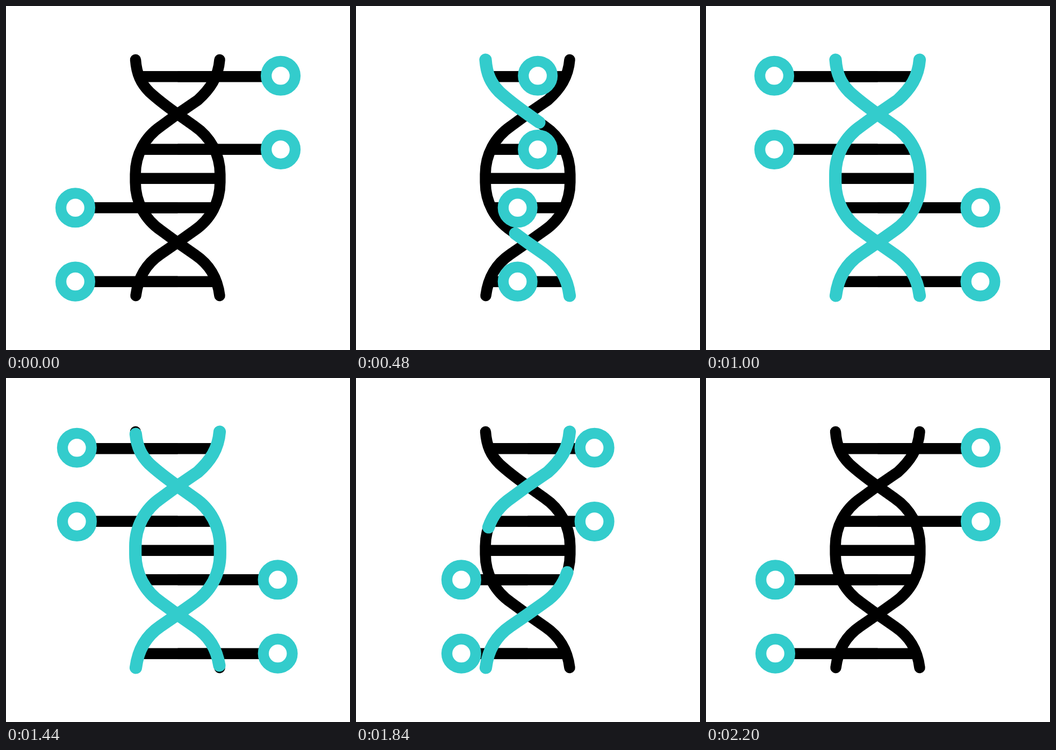
Recreate the animation shown at these times as an HTML page with a canvas. Size 640 by 640 pixels, loop 2400 ms.

```html
<!DOCTYPE html>
<html lang="en">
<head>
<meta charset="utf-8">
<title>DNA strand</title>
<style>
  html, body { margin: 0; width: 100%; height: 100%; overflow: hidden; background: #fff; }
  canvas { display: block; width: 640px; height: 640px; }
</style>
</head>
<body>
<canvas id="stage" width="640" height="640"></canvas>
<script>
const ctx = document.getElementById('stage').getContext('2d');
const TEAL = '#33cccc';
const LOOP = 2400, STEP = 40;
const MID = 319.5;

function strand(d) {
  const el = document.createElementNS('http://www.w3.org/2000/svg', 'path');
  el.setAttribute('d', d);
  return { path: new Path2D(d), length: el.getTotalLength() };
}

// Starts top left, bulges right, ends bottom left.
const right = strand('M241 100 C243 127 251 144 267 160 C280 172 298 186 319 201 ' +
  'L350 223 C381 244 398.3 277 398.3 313 V328 C398.3 364 381 397 350 418 ' +
  'L319 440 L287 462 C262 479 246 503 241.5 539');
// Starts bottom right, bulges left, ends top right.
const left = strand('M397.5 539 C393 503 377 480 352 463 L319 440 ' +
  'L289 418 C258 397 240.7 364 240.7 328 V313 C240.7 277 258 244 289 223 ' +
  'L319 201 L357 175 C380 154 395 132 397.5 100');

const rows = [
  { bar: 131.3, ring: 129.8, from: 511, to: 127 },
  { bar: 266.7, ring: 267, from: 511, to: 127 },
  { bar: 375.3, ring: 375.3, from: 129, to: 510.5 },
  { bar: 512.8, ring: 512.6, from: 129, to: 510.5 }
];

function ease(t, start, span) {
  const u = Math.min(1, Math.max(0, (t - start) / span));
  return u * u * (3 - 2 * u);
}

function bar(x1, x2, y) {
  ctx.fillStyle = '#000';
  ctx.fillRect(Math.min(x1, x2), y - 10.25, Math.abs(x2 - x1), 20.5);
}

function ring(x, y) {
  ctx.beginPath();
  ctx.arc(x, y, 26.9, 0, Math.PI * 2);
  ctx.fillStyle = '#fff';
  ctx.fill();
  ctx.lineWidth = 20.3;
  ctx.strokeStyle = TEAL;
  ctx.stroke();
}

// Strokes the part of a strand between two fractions of its length.
function trace(s, color, width, a = 0, b = 1) {
  if (b - a < 1e-4) return;
  const whole = a === 0 && b === 1;
  ctx.setLineDash(whole ? [] : [(b - a) * s.length, s.length * 2]);
  ctx.lineDashOffset = -a * s.length;
  ctx.strokeStyle = color;
  ctx.lineWidth = width;
  ctx.stroke(s.path);
  ctx.setLineDash([]);
}

function draw(t) {
  const slide = ease(t, 200, 600) - ease(t, 1400, 600);
  const head = ease(t, 200, 800);
  const tail = ease(t, 1400, 800);

  ctx.fillStyle = '#fff';
  ctx.fillRect(0, 0, 640, 640);
  ctx.lineCap = ctx.lineJoin = 'round';

  bar(241, 398, 320.8);
  for (const r of rows) {
    r.x = r.from + (r.to - r.from) * slide;
    bar(253, 386, r.bar);
    bar(MID, r.x, r.bar);
  }
  for (const s of [right, left]) trace(s, '#000', 20.5);
  for (const s of [right, left]) trace(s, TEAL, 23.2, tail, head);
  for (const r of rows) ring(r.x, r.ring);
}

const begin = performance.now();
function tick() {
  const t = Math.max(0, performance.now() - begin) % LOOP;
  draw(Math.floor(t / STEP) * STEP);
  requestAnimationFrame(tick);
}
tick();
</script>
</body>
</html>
```
